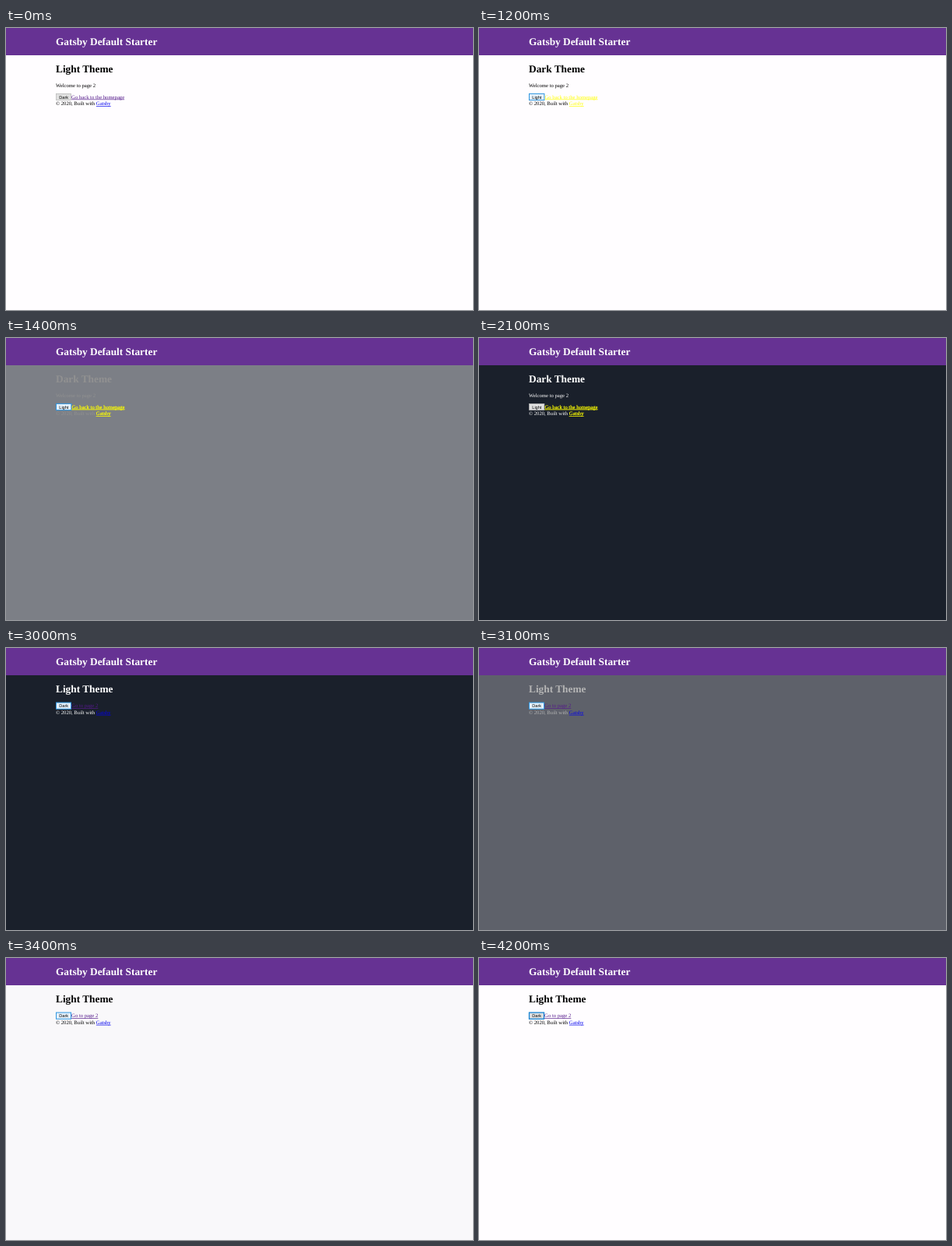
Recreate the animation shown at these times as an HTML page. Size 600 px wide and 362 px high, loop 4600 ms.

```html
<!DOCTYPE html>
<html lang="en">
<head>
<meta charset="utf-8">
<title>Theme switch</title>
<style>
  html, body { margin: 0; height: 100%; overflow: hidden; }
  svg { display: block; width: 100vw; height: 100vh; }
  text {
    font: 6.667px "Liberation Serif", "Times New Roman", serif;
    text-rendering: geometricPrecision;
    white-space: pre;
  }
  .big { font-size: 13.333px; font-weight: bold; }
  .link { text-decoration: underline; }
  #label { font: 5.556px "Liberation Sans", Arial, sans-serif; }
</style>
</head>
<body>
<svg viewBox="0 0 600 362">
  <rect id="page" width="600" height="362"/>
  <rect width="600" height="35" fill="#663293"/>
  <text class="big" x="64" y="22" fill="#fff">Gatsby Default Starter</text>
  <g id="content">
    <text id="heading" class="big" x="64" y="57.3"></text>
    <text id="welcome" x="64" y="75.8">Welcome to page 2</text>
  </g>
  <g id="row">
    <rect id="button" x="64.5" y="84.4" height="8.2"/>
    <text id="label" x="68.3" y="90.5" fill="#000"></text>
    <text id="nav" class="link" y="90.5"></text>
    <text id="footer" x="64" y="99.1">© 2020, Built with <tspan id="credit" class="link">Gatsby</tspan></text>
  </g>
</svg>
<script>
const LOOP = 4600, STEP = 100, FADE = 500;
const LIGHT = { page: [255, 253, 255], ink: [0, 0, 0] };
const DARK = { page: [26, 32, 43], ink: [255, 255, 255] };
const BUTTONS = {
  idle: { fill: "#e1e1e1", stroke: "#b4b4b4", "stroke-width": 0.7 },
  hover: { fill: "#e5f1fb", stroke: "#2f96e0", "stroke-width": 1 },
  focus: { fill: "#dfe1e3", stroke: "#1683d3", "stroke-width": 1.3 }
};
// Pointer and focus history: [start time, button look]
const POINTER = [
  [0, "idle"], [600, "hover"], [1800, "focus"],
  [2100, "idle"], [2700, "hover"], [3900, "focus"]
];

const el = id => document.getElementById(id);
const set = (id, attrs) => {
  for (const key in attrs) el(id).setAttribute(key, attrs[key]);
};
const write = (id, text) => { el(id).textContent = text; };
const mix = (a, b, k) => `rgb(${a.map((v, i) => Math.round(v + (b[i] - v) * k))})`;

// CSS "ease": cubic-bezier(.25, .1, .25, 1), solved by bisection
function ease(x) {
  if (x <= 0) return 0;
  if (x >= 1) return 1;
  const curve = (p, q, s) => 3 * p * s * (1 - s) ** 2 + 3 * q * s * s * (1 - s) + s ** 3;
  let lo = 0, hi = 1;
  for (let i = 0; i < 24; i++) {
    const mid = (lo + hi) / 2;
    if (curve(0.25, 0.25, mid) < x) lo = mid; else hi = mid;
  }
  return curve(0.1, 1, lo);
}

function draw(now) {
  const t = Math.floor((now % LOOP) / STEP) * STEP;
  const dark = t >= 1200 && t < 3000;
  const home = t >= 2200;
  const shade = ease((t - 1235) / FADE) - ease((t - 3000) / FADE);
  const ink = mix(LIGHT.ink, DARK.ink, shade);
  const look = BUTTONS[POINTER.filter(([start]) => start <= t).pop()[1]];
  const stroke = { stroke: dark && shade > 0 ? "#ff0" : "none", "stroke-width": 0.2 };

  set("page", { fill: mix(LIGHT.page, DARK.page, shade) });
  set("content", { fill: ink });
  set("footer", { fill: ink });
  set("welcome", { visibility: home ? "hidden" : "visible" });
  set("row", { transform: `translate(0 ${home ? -14.35 : 0})` });
  set("button", { ...look, width: dark ? 19.4 : 19 });
  set("nav", { x: dark ? 84.5 : 84.1, fill: dark ? "#ff0" : "#551a8b", ...stroke });
  set("credit", { fill: dark ? "#ff0" : "#00e", ...stroke });
  write("heading", dark ? "Dark Theme" : "Light Theme");
  write("label", dark ? "Light" : "Dark");
  write("nav", home ? "Go to page 2" : "Go back to the homepage");
}

const begin = performance.now();
function tick() {
  draw(performance.now() - begin);
  requestAnimationFrame(tick);
}
tick();
</script>
</body>
</html>
```
